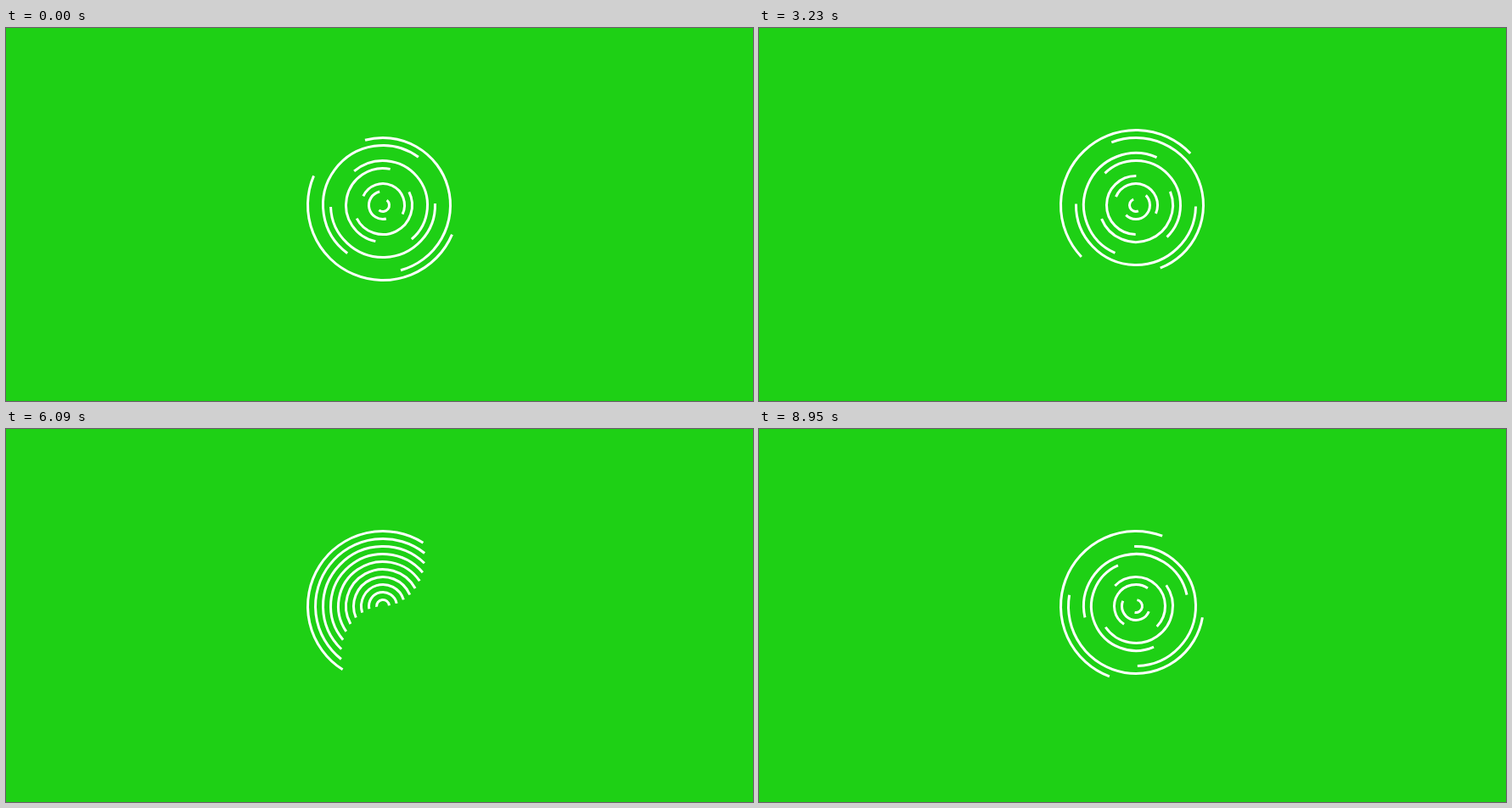
These frames come from a looping animation (880 by 440 pixels, 9050 ms). An HTML page with a canvas:

```html
<!DOCTYPE html>
<html lang="en">
<head>
<meta charset="utf-8">
<title>Spinning rings</title>
<style>
  html, body { margin: 0; width: 100%; height: 100%; overflow: hidden; background: #1ed015; }
  canvas { display: block; }
</style>
</head>
<body>
<canvas id="stage" width="880" height="440"></canvas>
<script>
const LOOP = 9050;
const RINGS = 10;
const RING_GAP = 9;
const LINE_WIDTH = 3;
const START_TURN = 128.3;      // degrees, innermost ring
const TURN_SPEED = 0.03718;    // degrees per ms, innermost ring
const STEP_LEAD = 20;          // ms by which a held pose appears early

// [step, ms]: the slightly uneven pace of the held poses
const PACE = [[0, 0], [10, 1360], [18, 2510], [29, 4050], [38, 5260], [51, 7030], [65, 8950]];

const ctx = document.getElementById('stage').getContext('2d');

// Start of the pose that is held at the given time
function heldTime(time) {
  const next = PACE.findIndex(([, ms]) => ms > time + STEP_LEAD);
  if (next < 0) return PACE.at(-1)[1];
  const [step0, ms0] = PACE[next - 1], [step1, ms1] = PACE[next];
  const stepLength = (ms1 - ms0) / (step1 - step0);
  return ms0 + Math.floor((time + STEP_LEAD - ms0) / stepLength) * stepLength;
}

function draw(time) {
  const turn = (START_TURN + TURN_SPEED * heldTime(time)) * Math.PI / 180;

  ctx.clearRect(0, 0, 880, 440);
  ctx.strokeStyle = '#fff';
  ctx.lineWidth = LINE_WIDTH;
  // Half circles; each ring turns as many times faster as its number
  for (let ring = 1; ring <= RINGS; ring++) {
    const start = Math.PI + ring * turn;
    ctx.beginPath();
    ctx.arc(444, 209, ring * RING_GAP - LINE_WIDTH / 2, start, start + Math.PI);
    ctx.stroke();
  }
}

const startTime = performance.now();
function tick() {
  draw((performance.now() - startTime) % LOOP);
  requestAnimationFrame(tick);
}
tick();
</script>
</body>
</html>
```
